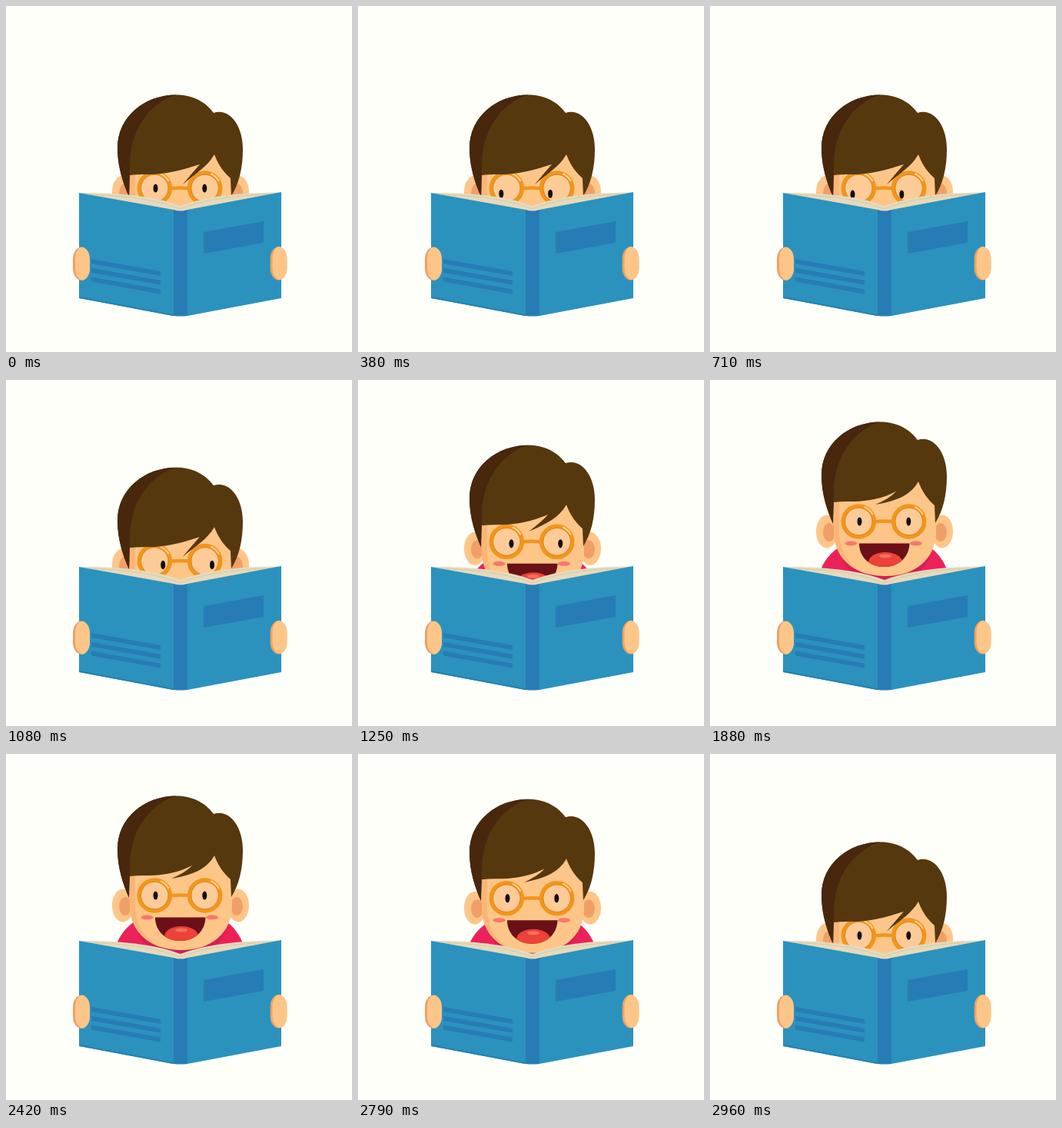
These frames come from a looping animation (450x450 px, 3000 ms). An HTML page with a canvas:

```html
<!DOCTYPE html>
<html lang="en">
<head>
<meta charset="utf-8">
<title>Reading</title>
<style>
html, body { margin: 0; width: 100%; height: 100%; overflow: hidden; background: #fffffa; }
canvas { display: block; width: 450px; height: 450px; }
</style>
</head>
<body>
<canvas id="stage" width="450" height="450"></canvas>
<script>
const ctx = document.getElementById('stage').getContext('2d');
const LOOP = 3000;
const C = {
  paper: '#fffffa', hair: '#56380e', hairDark: '#48270d',
  skin: '#fdc688', shade: '#f9b676', lens: '#fdcb98', ear: '#f0a066',
  frame: '#f3951b', frameDark: '#d98216', shine: '#fcd28c',
  cheek: '#f7776d', mouth: '#6a1016', tongue: '#ec4238', tongueLight: '#f4705a',
  shirt: '#ec215a', shirtDark: '#d41e52',
  cover: '#2b92bd', ink: '#287cb5', edge: '#2582af', page: '#e5dabc', pageDark: '#d6cba8'
};

const mix = (a, b, k) => a + (b - a) * k;
const ease = (t, from, to) => {
  const k = Math.min(1, Math.max(0, (t - from) / (to - from)));
  return k * k * (3 - 2 * k);
};

function fill(d, color) {
  ctx.fillStyle = color;
  ctx.fill(new Path2D(d));
}

function line(d, color, width) {
  ctx.strokeStyle = color;
  ctx.lineWidth = width;
  ctx.lineCap = 'round';
  ctx.stroke(new Path2D(d));
}

function oval(x, y, rx, ry, color) {
  ctx.fillStyle = color;
  ctx.beginPath();
  ctx.ellipse(x, y, rx, ry, 0, 0, Math.PI * 2);
  ctx.fill();
}

function arc(x, y, r, from, to, color, width) {
  ctx.strokeStyle = color;
  ctx.lineWidth = width;
  ctx.beginPath();
  ctx.arc(x, y, r, from, to);
  ctx.stroke();
}

function shifted(dy, draw) {
  ctx.save();
  ctx.translate(0, dy);
  draw();
  ctx.restore();
}

function body() {
  fill('M142 252 C147 236 157 224 170 216 H283 C296 223 305 236 310 252 L228 290 Z', C.shirt);
  fill('M168 222 H288 C282 250 258 262 228 262 C198 262 175 250 168 222 Z', C.shirtDark);
}

function ears() {
  for (const [x, inner] of [[152, 155], [302, 300]]) {
    oval(x, 197, 14, 21.5, C.skin);
    oval(inner, 198, 8, 12, C.ear);
  }
}

function mouth() {
  ctx.save();
  ctx.beginPath();
  ctx.moveTo(194, 212.5);
  ctx.lineTo(259.5, 212.5);
  ctx.bezierCurveTo(259, 230, 246, 243, 226.5, 243);
  ctx.bezierCurveTo(207, 243, 194, 230, 194, 212.5);
  ctx.fillStyle = C.mouth;
  ctx.fill();
  ctx.clip();
  oval(228, 237, 22, 13, C.tongue);
  oval(228, 229, 8, 2.5, C.tongueLight);
  ctx.restore();
}

function face(eyeX, eyeY) {
  fill('M161 105 H294 V196 C294 234 266 255 228 255 C190 255 161 234 161 196 Z', C.skin);
  fill('M161 150 H168 V196 C168 226 184 244 204 252 C179 245 161 226 161 196 Z', C.shade);
  oval(183.5, 212.5, 8, 3, C.cheek);
  oval(268, 212.5, 8, 3, C.cheek);
  mouth();
  line('M217 184 Q226 183 236 184', C.frame, 4.5);
  for (const x of [193.3, 258.7]) {
    oval(x, 184, 20, 20, C.lens);
    arc(x, 184, 20.3, 0, Math.PI * 2, C.frame, 5);
    arc(x, 184, 17.8, 0, Math.PI * 2, C.frameDark, 1);
    arc(x, 184, 20.3, -1.15, -0.5, C.shine, 2);
  }
  for (const x of [194.5, 258.3]) oval(x + eyeX, 184 + eyeY, 3, 5.6, '#120d08');
}

// The loose lock of the fringe swings as the head ducks.
function hair(duck) {
  const tipX = mix(215, 230, duck), tipY = mix(162, 171, duck), rootX = mix(242, 252, duck);
  const leftSide = 'M160 187 C153 171 145 149 145 124 C145 83 180 54.5 222 54.5';
  fill(`${leftSide}
    C243 54.5 260 64 270 78 C289 71 308 92 308 125 C308 150 303 170 293 186
    L292 163 C284 156 276 146 271 132
    C262 148 246 157 ${tipX} ${tipY}
    Q${rootX - 8} 154 ${rootX} 145
    C227 153 206 158 187 158 C178 158 168 158 161 159 Z`, C.hair);
  fill(`${leftSide} C194 62 162 92 161 145 Z`, C.hairDark);
}

function book() {
  fill('M96 243 C140 242.5 190 246 227 260 C264 246 314 242.5 357 242.5 L236 268 H218 Z', C.page);
  line('M110 245.5 Q184 247 226 264 Q268 247 344 245', C.pageDark, 1);
  fill('M95 243 L218 265 V403 L95 380 Z', C.cover);
  fill('M236 265 L358 242 V380 L236 403 Z', C.cover);
  fill('M218 265 Q227 268 236 265 V403 Q227 404 218 403 Z', C.ink);
  line('M96 379 L217 402', C.edge, 2);
  fill('M257 294 L335 280 V308 L257 322 Z', C.ink);
  for (let i = 0; i < 3; i++) {
    shifted(i * 11.7, () => fill('M111 329 L201 345 V351 L111 335 Z', C.ink));
  }
}

function hand(x, y) {
  const round = { x: 11, y: 16 };
  ctx.save();
  ctx.beginPath();
  ctx.roundRect(x, y, 22, 43.5, round);
  ctx.clip();
  ctx.fillStyle = C.ear;
  ctx.fillRect(x, y, 22, 44);
  ctx.fillStyle = C.skin;
  ctx.beginPath();
  ctx.roundRect(x + 3, y - 1, 22, 44.5, round);
  ctx.fill();
  ctx.restore();
}

function draw(t) {
  const up = ease(t, 1040, 1460);
  const duck = 1 - up + ease(t, 2755, 2978);
  const left = ease(t, 210, 420), right = ease(t, 750, 960);
  const eyeX = (mix(0, -9, left) + 19 * right) * (1 - up);
  const eyeY = (mix(0, 8, left) - 3 * right) * (1 - up);

  ctx.fillStyle = C.paper;
  ctx.fillRect(0, 0, 450, 450);
  shifted(34 * duck, body);
  shifted(45 * duck, ears);
  shifted(53 * duck, () => face(eyeX, eyeY));
  shifted(61 * duck, () => hair(duck));
  book();
  hand(87, 313.5);
  hand(343.5, 313);
}

const start = performance.now();
function tick() {
  draw((performance.now() - start) % LOOP);
  requestAnimationFrame(tick);
}
tick();
</script>
</body>
</html>
```
